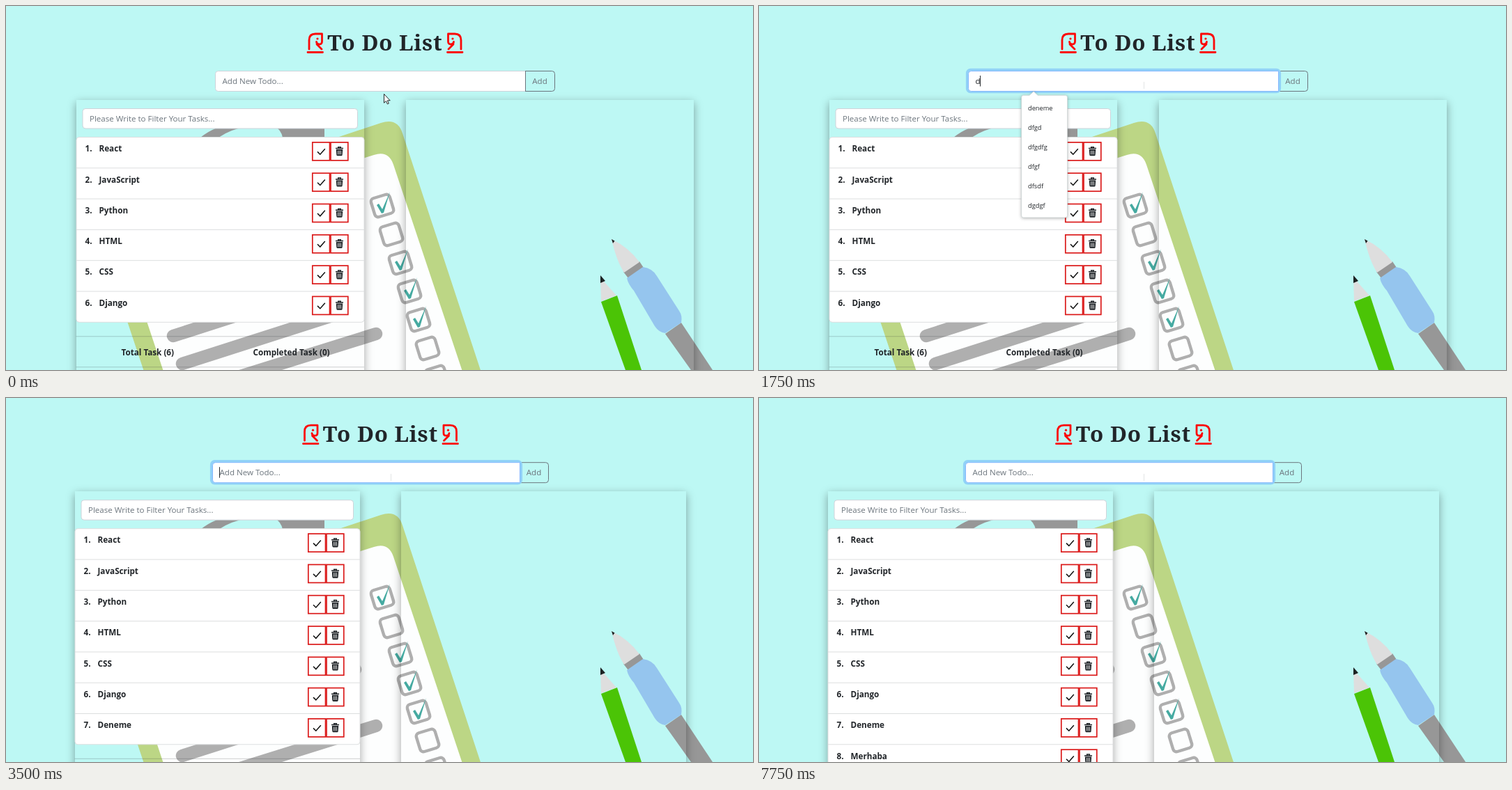
Animation of 1072x523 px, one loop 8 s. Source, as an HTML page:

```html
<!DOCTYPE html>
<html lang="en">
<head>
<meta charset="utf-8">
<title>To Do List</title>
<style>
html, body { margin: 0; width: 100%; height: 100%; overflow: hidden; background: #bdf8f4; }
svg, #panels { position: absolute; left: 0; top: 0; display: block; width: 100%; height: 100%; overflow: hidden; }
.panel { position: absolute; bottom: -40px; box-shadow: 0 4px 12px rgba(0,0,0,.36); }
text { font-family: "Open Sans", "Noto Sans", sans-serif; font-size: 11.55px; fill: #212529; white-space: pre; }
.hint { fill: #6c757d; }
.bold { font-size: 11.7px; font-weight: 700; }
.small { font-size: 9.25px; }
.title { font: 700 31.3px "Noto Serif", Georgia, serif; letter-spacing: .75px; }
</style>
</head>
<body>
<svg id="back" viewBox="0 0 1072 523">
  <path fill="#bcd685" d="M125 306L538 168Q562 160 569 183L687.500 543H204Z"/>
  <path fill="#fdfefe" d="M161 330L528 214Q549 207 556 228L661 543H232Z"/>
  <path fill="#979797" d="M279 189Q290 180 303 175L330 163H457V190H279Z"/>
  <path fill="#bdf8f4" d="M305 189Q322 177 350 172H385Q395 178 397 189Z"/>
  <path stroke="#afafaf" stroke-width="18.5" stroke-linecap="round" d="M240 474L501 390M253 514L490 438M266 554L531 471"/>
  <g id="boxes"></g>
  <path fill="#4bc406" d="M854 425L877 416L912 523H889Z"/>
  <path fill="#dedede" d="M853 390L876 416L854 424Z"/>
  <path fill="#1c2222" d="M853 387L860 395L853 398Z"/>
  <path fill="#979797" d="M946 471L969 455L1014 523H983ZM886 382L909 367L915 376L893 391Z"/>
  <path fill="#dedede" d="M869 335Q894 347 909 368L887 383Q876 366 869 335Z"/>
  <path fill="#1c2222" d="M869 335L873.500 337.500L871 341Z"/>
  <path fill="#95c5ee" d="M891 391Q893 400 901 409L931 460Q937 469 946 470L969 455Q971 445 966 438L934 388Q928 377 914 375Z"/>
</svg>
<div id="panels">
  <div class="panel" id="left"></div>
  <div class="panel" id="right"></div>
</div>
<svg id="ui" viewBox="0 0 1072 523"></svg>
<script>
const $ = id => document.getElementById(id);
const LOOP = 8000;
const tasks = ['React', 'JavaScript', 'Python', 'HTML', 'CSS', 'Django', 'Deneme', 'Merhaba'];
const run = 'm,me,m,mer,';
const history = ['asdasd', 'deneme', 'merhaba',
  run + 'm,me,m,merh,' + run + 'm,me,m,merha,' + run + run, 'hjk', 'ökj'];
const dWords = ['deneme', 'dfgd', 'dfgdfg', 'dfgf', 'dfsdf', 'dgdgf'];

// Page geometry without and with the scrollbar
const wide = { dy: 0, mid: 543.5, inL: 300.5, inR: 745.5, addR: 787.5, p1: [100.5, 514], p2: [573.5, 987] };
const narrow = { dy: -0.8, mid: 537, inL: 296.5, inR: 737.5, addR: 778.5, p1: [98.5, 508], p2: [566.5, 976] };

// Each step changes part of the state
const steps = [
  [0, { page: wide, count: 6, text: '', caret: 0, ring: 0, list: null, pointer: 'arrow', wavy: 0 }],
  [250, { pointer: '' }],
  [500, { pointer: 'beam', caret: 1, ring: 0.4 }],
  [750, { ring: 1, list: history }],
  [1250, { caret: 0 }],
  [1750, { text: 'd', caret: 1, list: dWords }],
  [2000, { text: 'de', list: ['deneme'] }],
  [2250, { text: 'deneme' }],
  [2500, { list: null }],
  [2750, { caret: 0 }],
  [3250, { caret: 1, wavy: 1 }],
  [3500, { page: narrow, count: 7, text: '', wavy: 0 }],
  [3750, { caret: 0 }],
  [4500, { caret: 1 }],
  [5000, { caret: 0 }],
  [5500, { text: 'me', caret: 1, list: ['merhaba'] }],
  [5750, { text: 'mer' }],
  [6000, { text: 'merhaba' }],
  [6250, { list: null }],
  [6750, { caret: 0 }],
  [7250, { count: 8, text: '', caret: 1 }],
  [7750, { caret: 0 }]
];

const text = (x, y, s, cls = '', more = '') => `<text x="${x}" y="${y}" class="${cls}" ${more}>${s}</text>`;
const rect = (x, y, w, h, more) => `<rect x="${x}" y="${y}" width="${w}" height="${h}" ${more}/>`;
const path = (d, more) => `<path d="${d}" ${more}/>`;
const line = (x1, x2, y, color) => path(`M${x1} ${y}H${x2}`, `stroke="${color}"`);

function drawBoxes() {
  let out = '';
  for (let i = 0; i < 7; i++) {
    const done = [0, 2, 3, 4].includes(i);
    out += `<g transform="translate(${540 + 13 * i} ${287 + 41 * i})">` +
      rect(-14, -14, 28, 28, 'rx="5" fill="none" stroke="#afafaf" stroke-width="4.4" transform="rotate(-17)"') +
      (done ? path('M-8 -1L-5 -3L0 5L11 -20L2 10L-1 11Z', 'fill="#45aaa1"') : '') + '</g>';
  }
  $('boxes').innerHTML = out;
}

function header(p) {
  const knight = path('M435 62V49Q435 40 444 40H453.500V51Q453.500 55 449.500 55Q446 55 445.500 51.500M446 55L453 62M433 66.500H454.500',
    'fill="none" stroke="#fb0808" stroke-width="2.8" stroke-linecap="round" stroke-linejoin="round"') +
    '<circle cx="447" cy="47" r="1.6" fill="#fb0808"/>';
  const dx = p.mid - 543.5;
  return `<g transform="translate(${dx} ${p.dy})">${knight}<g transform="translate(1088 0) scale(-1 1)">${knight}</g></g>` +
    text(p.mid + .4, 64 + p.dy, 'To Do List', 'title', 'text-anchor="middle"');
}

function entry(s) {
  const p = s.page, y = 93 + p.dy, w = p.inR - p.inL;
  let out = path(`M${p.inR} ${y + .5}H${p.addR - 4}q4 0 4 4v21q0 4 -4 4H${p.inR}Z`, 'fill="none" stroke="#6c757d"') +
    text((p.inR + p.addR) / 2 - .5, y + 19, 'Add', 'hint', 'text-anchor="middle"');
  if (s.ring) out += rect(p.inL - 1.6, y - 1.2, w + 3.2, 31.4,
    `rx="4.500" fill="none" stroke="#91d2f7" stroke-width="4" opacity="${s.ring}"`);
  out += path(`M${p.inR} ${y + .5}H${p.inL + 4}q-4 0 -4 4v21q0 4 4 4H${p.inR}Z`,
    `fill="#fff" stroke="${s.ring ? '#86b7fe' : '#ced4da'}"`);
  if (!s.ring) out += path(`M${p.inR} ${y}v30`, 'stroke="#6c757d"');
  const x = p.inL + 10;
  if (!s.text) out += text(x, y + 19, 'Add New Todo...', 'hint');
  return out + text(x, y + 19, s.text, '', 'id="typed"') + '<g id="caret"></g>';
}

function row(p, i) {
  const [l, r] = p.p1, y = 188.5 + p.dy + 44.3 * i, b = r - 74;
  const box = 'fill="#fff" stroke="#db1a1a" stroke-width="1.7"';
  const icons = path('M7 13.500l3.800 3.800l7 -8', 'fill="none" stroke="#111" stroke-width="1.5"') +
    path('M33 8.700H44M36.700 8V6.900H40.300V8', 'fill="none" stroke="#212529" stroke-width="1.5"') +
    path('M33.800 10.200H43.200L42.600 18q-.1 1.300 -1.300 1.300H35.700q-1.200 0 -1.300 -1.300Z', 'fill="#212529"') +
    path('M36.500 11.800v5.700M38.500 11.800v5.700M40.500 11.800v5.700', 'stroke="#fff" stroke-width=".8"');
  return (i ? line(l + .5, r, y, '#dcdedf') : '') +
    text(l + 13, y + 20.7, i + 1 + '.', 'bold') + text(l + 33, y + 20.7, tasks[i], 'bold') +
    `<g transform="translate(${b} ${y + 7.4})">${rect(-.2, 0, 24.7, 26, box)}${rect(26, 0, 24.8, 26, box)}${icons}</g>`;
}

function panel(s) {
  const p = s.page, [l, r] = p.p1, y = 147 + p.dy, h = 44.3 * s.count;
  let out = rect(l + 9.5, y + .5, r - l - 19, 28.5, 'rx="4" fill="#fff" stroke="#ced4da"') +
    text(l + 19.5, y + 18.8, 'Please Write to Filter Your Tasks...', 'hint') +
    rect(l + .5, 188.5 + p.dy, r - l - .5, h, 'rx="4" fill="#fff" stroke="#dcdedf"');
  for (let i = 0; i < s.count; i++) out += row(p, i);
  const end = 188.5 + p.dy + h + 20.5, rule = 'rgba(33,37,41,.22)';
  return out + line(l, r, end, rule) + line(l, r, end + 44, rule) +
    text(l + 65, end + 26.7, `Total Task (${s.count})`, 'bold') +
    text(l + 254, end + 26.7, 'Completed Task (0)', 'bold');
}

function dropdown(s) {
  if (!s.list) return '';
  const p = s.page, x = p.inL + 76.1, y = 128.3 + p.dy;
  const w = s.list === history ? 355 : 66, h = s.list.length * 28 + 7.7;
  const shape = `M${x + 3} ${y}h8.500l6 -5.500l6 5.500H${x + w - 3}q3 0 3 3v${h - 6}q0 3 -3 3H${x + 3}q-3 0 -3 -3v${6 - h}q0 -3 3 -3Z`;
  return `<clipPath id="cut">${rect(x, y, w - 9.5, h, '')}</clipPath>` +
    path(shape, 'fill="#fff" stroke="#c6cfcf" stroke-width=".7" style="filter:drop-shadow(0 1px 2px rgba(0,0,0,.28))"') +
    '<g clip-path="url(#cut)">' +
    s.list.map((word, i) => text(x + 9.4, y + 21.3 + 28 * i, word, 'small')).join('') + '</g>';
}

function pointer(kind) {
  if (kind === 'arrow') return path('M542.500 126.500V139.200L545.400 136.500L547.400 140.900L549.300 140L547.400 135.800H551.200Z',
    'fill="#fff" stroke="#111" stroke-width=".9"');
  return kind ? path('M552.500 109V119', 'stroke="#e3e6e6"') : '';
}

function place(id, [l, r], dy) {
  const st = $(id).style;
  st.left = l + 'px';
  st.width = r - l + 'px';
  st.top = 135 + dy + 'px';
}

function render(s) {
  const p = s.page;
  place('left', p.p1, p.dy);
  place('right', p.p2, p.dy);
  $('ui').innerHTML = header(p) + panel(s) + entry(s) + dropdown(s) + pointer(s.pointer);
  const x = p.inL + 10, len = s.text ? $('typed').getComputedTextLength() : 0, y = p.dy;
  $('caret').innerHTML =
    (s.wavy ? line(x, x + len, 114.5 + y, '#e05252') : '') +
    (s.caret ? path(`M${x + len} ${100 + y}V${115.5 + y}`, 'stroke="#212529"') : '');
}

let shown = -1;
function tick() {
  const t = performance.now() % LOOP;
  const n = steps.filter(([at]) => at <= t).length;
  if (n !== shown) {
    shown = n;
    render(Object.assign({}, ...steps.slice(0, n).map(step => step[1])));
  }
  requestAnimationFrame(tick);
}

drawBoxes();
tick();
</script>
</body>
</html>
```
